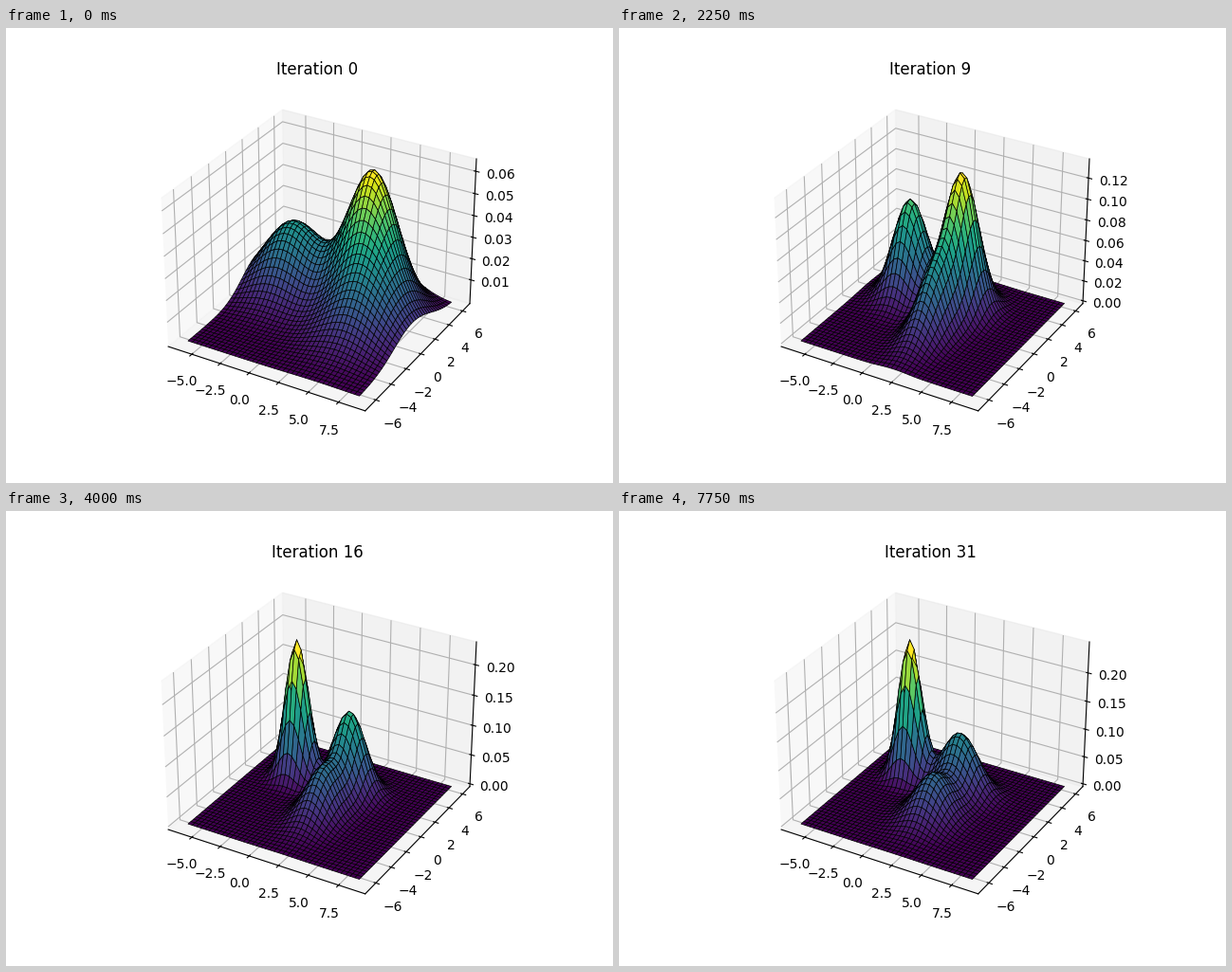
Write a matplotlib script that moves like this. It is 640 by 480 pixels and loops after 8 s.

```python
import numpy as np
import matplotlib.pyplot as plt
from matplotlib.animation import FuncAnimation

STEPS, STEP_MS = 32, 250
X, Y = np.meshgrid(np.linspace(-6.03, 8.6, 40), np.linspace(-6.43, 6.17, 40))


def ease(n, start, end):
    s = min(max((n - start) / (end - start), 0), 1)
    return s * s * (3 - 2 * s)


def gaussian(mx, my, sx, sy):
    u, v = (X - mx) / sx, (Y - my) / sy
    return np.exp(-(u * u + v * v) / 2) / (2 * np.pi * sx * sy)


def density(n):
    """Sum of three bells that jump, narrow and then slowly settle."""
    jump = ease(n, 0, 2)
    narrow = ease(n, 2, 7)
    shrink = ease(n, 2, 16)
    settle = ease(n, 12, 31)

    left = gaussian(mx=-2.8 + 0.4 * jump + 0.15 * narrow,
                    my=2.2 + 0.2 * jump - 0.5 * narrow,
                    sx=2.4 - 0.4 * jump - 0.4 * narrow - 0.67 * shrink,
                    sy=2.0 - 0.1 * jump - 1.16 * shrink - 0.05 * settle)
    right = gaussian(mx=3.5 - 1.1 * jump - 0.32 * settle,
                     my=3.1 - 1.1 * jump,
                     sx=1.9 - 0.1 * jump - 0.55 * narrow + 0.28 * settle,
                     sy=1.65 - 0.05 * jump - 0.15 * narrow - 0.45 * shrink)
    front = gaussian(mx=5.0 - 2.95 * jump,
                     my=0.3 + 0.1 * jump - 0.9 * narrow - 0.5 * shrink - 0.5 * settle,
                     sx=2.4 - 1.25 * jump - 0.15 * narrow + 0.15 * shrink + 0.2 * settle,
                     sy=2.3 - 0.55 * jump + 0.75 * narrow - 0.8 * shrink - 0.2 * settle)
    return left + right + front


fig = plt.figure(figsize=(6.4, 4.8), dpi=100)
ax = fig.add_subplot(projection="3d")


def draw(n):
    ax.clear()
    Z = density(n)
    ax.plot_surface(X, Y, Z, cmap="viridis", edgecolor="black", linewidth=0.5)
    # Keep only ticks inside the data range
    low, high = Z.min() - 1e-6 * Z.max(), Z.max()
    ax.set_zticks([t for t in ax.get_zticks() if low <= t <= high])
    ax.set_title(f"Iteration {n}")


anim = FuncAnimation(fig, draw, frames=STEPS, interval=STEP_MS,
                     init_func=lambda: None, repeat=True, repeat_delay=0)
plt.show()
```
